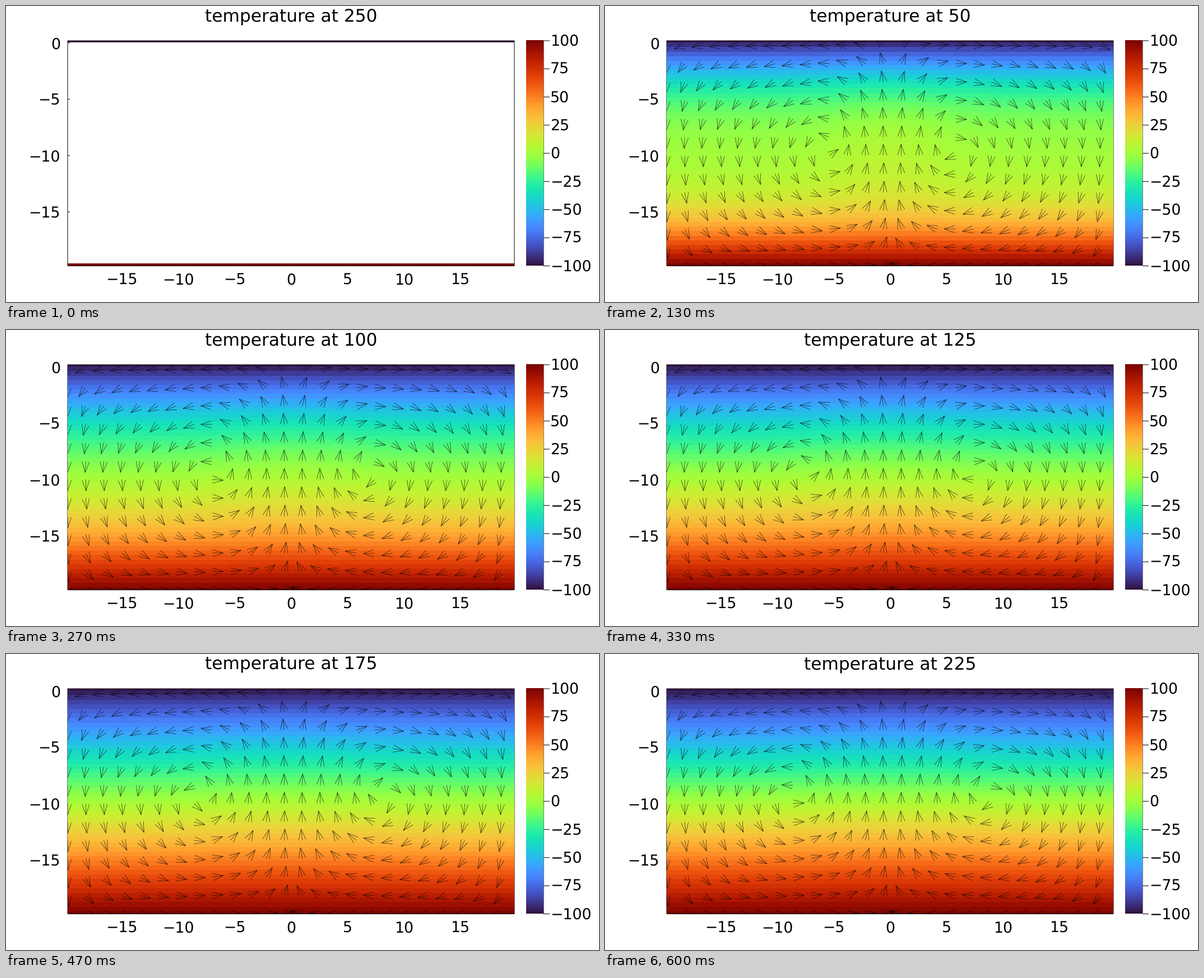
Animation, 1058 px wide and 529 px high, one loop 0.67 s. Source, as a matplotlib script:

```python
import numpy as np
import matplotlib
import matplotlib.pyplot as plt
from matplotlib.animation import FuncAnimation
from matplotlib.collections import LineCollection
from matplotlib.patches import Rectangle

matplotlib.rcParams["font.family"] = "DejaVu Sans"
matplotlib.rcParams["text.hinting"] = "none"

W, H, DPI = 1058, 529, 100
LEFT, RIGHT, TOP, BOTTOM = 110, 907, 62, 464.5
SCALE = (RIGHT - LEFT) / 39.6      # pixels per unit of length
NX, NY = 100, 50
TICK_PX, TITLE_PX = 26.8, 31.3

xc = np.linspace(-19.8, 19.8, NX)
depth = np.linspace(0, 20, NY)     # height above the hot floor
yc = depth - 19.8


def to_x(x):
    return 508.5 + SCALE * x


def to_y(y):
    return TOP + SCALE * (0.2 - y)


# A blob of heat spreads between a hot floor and a cold lid.
# Height is bent a little so that the rolls sit above the middle.
flow_y = np.linspace(0.2, 19.8, NY)
bent = flow_y - 0.4 * np.sin(np.pi * flow_y / 20)
slope = 1 - 0.02 * np.pi * np.cos(np.pi * flow_y / 20)


def fields(step):
    layers, blob = 4.3 * step, 4.5 * step ** 0.8
    temp = 100 - 10 * depth
    for n in range(2, 60, 2):
        k = n * np.pi / 20
        temp = temp - 400 / (n * np.pi) * np.exp(-k * k * layers) * np.sin(k * depth)
    temp = np.repeat(temp[:, None], NX, axis=1)
    u, w = np.zeros((NY, NX)), np.zeros((NY, NX))
    for m in range(0, 20):
        kx = m * np.pi / 20
        for n in range(1, 20, 2):
            ky = n * np.pi / 20
            k2 = kx * kx + ky * ky
            amp = 200 * np.pi / 400 * (2 if m else 1)
            amp *= np.sin(n * np.pi / 2) * np.exp(-k2 * (blob + 0.25))
            sin_y, cos_y = np.sin(ky * bent), np.cos(ky * bent) * slope
            temp[1:-1] += amp * np.outer(sin_y, np.cos(kx * xc))[1:-1]
            u -= amp * kx * ky / k2 * np.outer(cos_y, np.sin(kx * xc))
            w += amp * kx * kx / k2 * np.outer(sin_y, np.cos(kx * xc))
    return temp, u, w


def arrows(u, w):
    """Unit arrows on every fourth cell, each with a long open head."""
    back, half = 19.0, 6.5
    lines = []
    for j in range(0, NY, 4):
        for i in range(0, NX, 4):
            d = np.array([u[j, i], -w[j, i]]) / np.hypot(u[j, i], w[j, i])
            side = np.array([-d[1], d[0]])
            base = np.array([to_x(xc[i]), to_y(yc[j])])
            tip = base + SCALE * d
            lines.append([base, tip])
            lines.append([tip - back * d + half * side, tip,
                          tip - back * d - half * side])
    return lines


def blown_up():
    temp = np.full((NY, NX), np.nan)
    temp[0], temp[-1] = 100, -100
    return temp, []


scenes = [blown_up()]
for step in range(1, 10):
    temp, u, w = fields(step)
    scenes.append((temp, arrows(u, w)))

fig = plt.figure(figsize=(W / DPI, H / DPI), dpi=DPI, facecolor="white")
ax = fig.add_axes([0, 0, 1, 1])
ax.axis("off")


def line(x0, y0, x1, y1, width=1.0):
    ax.plot([x0, x1], [y0, y1], color="black", lw=width * 72 / DPI,
            zorder=1, solid_capstyle="butt", snap=False)


def label(x, y, text, px, align):
    return ax.text(x, y, text, fontsize=px * 72 / DPI, ha=align,
                   va="baseline", color="black")


def number(v):
    return str(v).replace("-", "\u2212")


# Frame and inner ticks lie under the heat map.
for x in (LEFT, RIGHT):
    line(x, TOP, x, BOTTOM)
for y in (TOP, BOTTOM):
    line(LEFT, y, RIGHT, y)
for v in range(-15, 16, 5):
    line(to_x(v), BOTTOM, to_x(v), BOTTOM - 4)
    label(to_x(v), 498, number(v), TICK_PX, "center")
for v in range(-15, 1, 5):
    line(LEFT, to_y(v), LEFT + 4, to_y(v))
    label(97, to_y(v) + 10.4, number(v), TICK_PX, "right")

# Colour bar
ax.imshow(np.linspace(0, 1, 256)[:, None], cmap="turbo", origin="lower",
          extent=(928, 959, BOTTOM, TOP), aspect="auto", zorder=2,
          interpolation="nearest")
line(959, TOP, 959, BOTTOM)
for v in range(-100, 101, 25):
    y = (TOP + BOTTOM) / 2 - v * (BOTTOM - TOP) / 200
    line(959, y, 970, y)
    label(971, y + 8.8, number(v), TICK_PX, "left")

title = label(508.5, 27.5, "", TITLE_PX, "center")
cell = 20 / (NY - 1)
heat = ax.imshow(scenes[0][0], cmap="turbo", vmin=-100, vmax=100, origin="lower",
                 extent=(to_x(-20), to_x(20), to_y(-19.8 - cell / 2), to_y(0.2 + cell / 2)),
                 aspect="auto", interpolation="nearest", zorder=3)
quiver = LineCollection([], colors="black", linewidths=0.55 * 72 / DPI, zorder=4)
ax.add_collection(quiver)
for part in (heat, quiver):
    part.set_clip_path(Rectangle((LEFT, TOP), RIGHT - LEFT, BOTTOM - TOP,
                                 transform=ax.transData))
ax.set_xlim(0, W)
ax.set_ylim(H, 0)


def update(tick):
    step = (3 * tick + 1) // 20    # ten pictures over 67 ticks
    temp, lines = scenes[step]
    heat.set_data(np.ma.masked_invalid(temp))
    quiver.set_segments(lines)
    title.set_text(f"temperature at {25 * step or 250}")
    return heat, quiver, title


anim = FuncAnimation(fig, update, frames=67, interval=10, repeat=True,
                     repeat_delay=0, blit=False)
plt.show()
```
